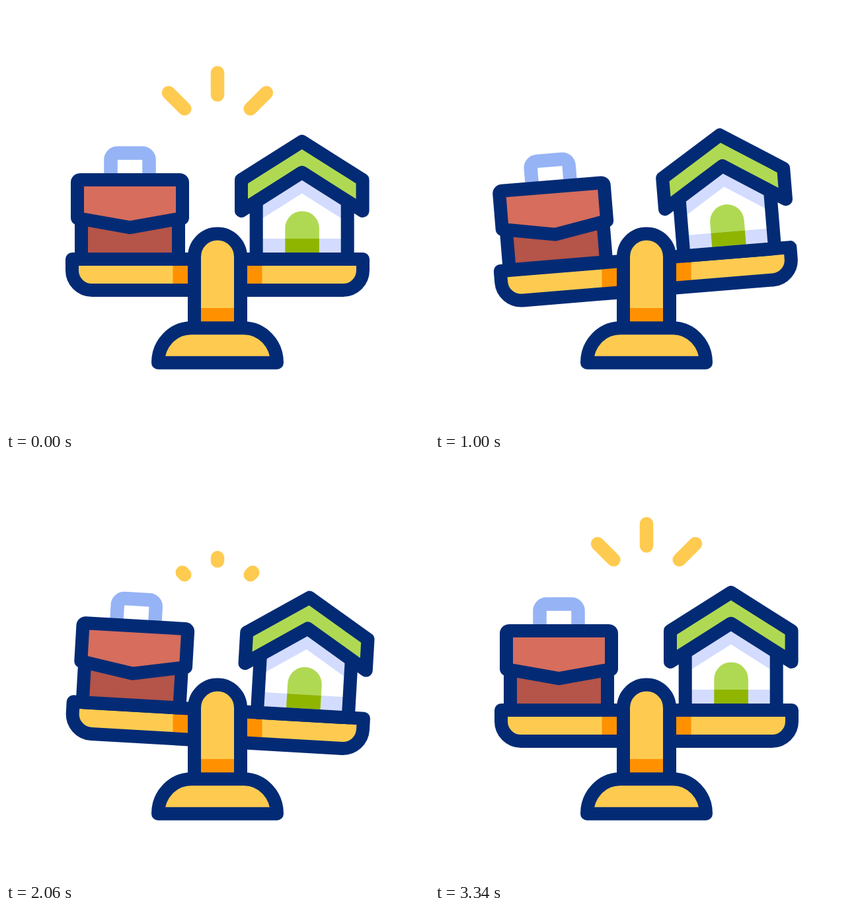
Animation of 640 by 640 pixels, one loop 3600 ms. Source, as an HTML page:

```html
<!DOCTYPE html>
<html lang="en">
<head>
<meta charset="utf-8">
<title>Work and home balance</title>
<style>
  html, body { margin: 0; width: 100%; height: 100%; overflow: hidden; background: #fff; }
  svg { display: block; width: 100%; height: 100%; }
  .line { stroke: #032b75; stroke-width: 20; stroke-linejoin: round; }
</style>
</head>
<body>
<svg viewBox="0 0 640 640">
  <defs>
    <path id="tray" d="M100 383H540V400a30 30 0 0 1-30 30H130a30 30 0 0 1-30-30Z"/>
    <clipPath id="trayClip"><use href="#tray"/></clipPath>
  </defs>

  <path id="sparks" fill="none" stroke="#fecb50" stroke-width="20.5" stroke-linecap="round"/>

  <g id="beam">
    <use href="#tray" fill="#fecb50"/>
    <g clip-path="url(#trayClip)">
      <path id="shade" fill="#ff9100" d="M252.5 300H387.5V520H252.5Z"/>
    </g>
    <use href="#tray" class="line" fill="none"/>

    <g id="bag">
      <path d="M158.5 263V232.5a10 10 0 0 1 10-10H206.5a10 10 0 0 1 10 10V263" fill="none" stroke="#96b3f5" stroke-width="20.5"/>
      <path class="line" fill="#b55448" d="M114 310H261V383H114Z"/>
      <path class="line" fill="#d66d5d" d="M112 263H263a4 4 0 0 1 4 4V321L187.5 335.2 108 321V267a4 4 0 0 1 4-4Z"/>
    </g>

    <g id="house">
      <path fill="#d3dcfe" d="M378.7 290L447.8 251 516.7 290V383H378.7Z"/>
      <path fill="#fff" d="M378.7 327.2L447.8 283.5 516.7 327.2V383H378.7Z"/>
      <path fill="#b0d953" d="M422.3 383V336.2a25.8 25.8 0 0 1 51.6 0V383Z"/>
      <g id="floor">
        <path fill="#d3dcfe" d="M380 352H516V373H380Z"/>
        <path fill="#90b500" d="M422.3 352H473.9V373H422.3Z"/>
      </g>
      <path class="line" fill="none" d="M378.7 290V383H516.7V290"/>
      <path class="line" fill="#b0d953" d="M356 263L447.8 205 539.6 263V310L447.8 251.8 356 310Z"/>
    </g>
  </g>

  <path class="line" fill="#fecb50" d="M285 487V379.5a35 35 0 0 1 70 0V487Z"/>
  <path fill="#ff9100" d="M295 457H345V478H295Z"/>
  <path class="line" fill="#fecb50" d="M230 539.7a50 52.5 0 0 1 50-52.5H360a50 52.5 0 0 1 50 52.5Z"/>
</svg>

<script>
const LOOP = 3600, RISE = 26.5;
const $ = id => document.getElementById(id);

// Keys are [time, value, speed]; speed defaults to 0, which eases in and out.
const tilt = [[200, 0], [690, -14], [1280, 5.1, .013], [1780, 11.7], [2340, -5], [2840, 3.2], [3340, 0]];
const houseLift = [[200, 0], [690, 31], [970, 0]];
const bagLift = [[970, 0], [1280, 24, .0164], [1780, 32.5], [2050, 0]];
const sparkOut = [[200, 0], [580, 1]];
const sparkIn = [[1960, 0], [2380, 1]];

// Each ray runs from its outer end to its inner end.
const rays = [[246, 131.3, 270.3, 155.5], [320, 101, 320, 134.5], [394, 131.3, 369.7, 155.5]];

function at(keys, t) {
  if (t <= keys[0][0]) return keys[0][1];
  const i = keys.findIndex(k => k[0] > t);
  if (i < 0) return keys[keys.length - 1][1];
  const [t0, a, va = 0] = keys[i - 1], [t1, b, vb = 0] = keys[i];
  const h = t1 - t0, p = (t - t0) / h, q = 1 - p;
  return a + (b - a) * p * p * (3 - 2 * p) + h * p * q * (va * q - vb * p);
}

function sparkPath(t) {
  const gone = at(sparkOut, t), grown = at(sparkIn, t);
  const entering = t >= 1960;
  if (entering ? grown <= 0 : gone >= 1) return '';
  const dy = entering ? RISE * (1 - grown) : -RISE * gone;
  const from = entering ? 1 - grown : 0;
  const to = entering ? 1 : 1 - gone;
  return rays.map(([x0, y0, x1, y1]) => {
    const point = u => `${x0 + (x1 - x0) * u} ${y0 + (y1 - y0) * u + dy}`;
    return `M${point(from)}L${point(to)}`;
  }).join('');
}

const set = (id, name, value) => $(id).setAttribute(name, value);

function draw(t) {
  const angle = at(tilt, t), lift = at(houseLift, t);
  set('beam', 'transform', `rotate(${angle} 320 406.5)`);
  set('shade', 'transform', `rotate(${-angle} 320 406.5)`);
  set('house', 'transform', `translate(0 ${-lift})`);
  set('bag', 'transform', `translate(0 ${-at(bagLift, t)})`);
  // The floor shadow sinks away as the house leaves the tray.
  const shadow = Math.max(0, 1 - lift / 21);
  set('floor', 'transform', `translate(0 ${373 * (1 - shadow)}) scale(1 ${shadow})`);
  set('sparks', 'd', sparkPath(t));
}

const start = performance.now();
function tick() {
  draw((performance.now() - start) % LOOP);
  requestAnimationFrame(tick);
}
tick();
</script>
</body>
</html>
```
